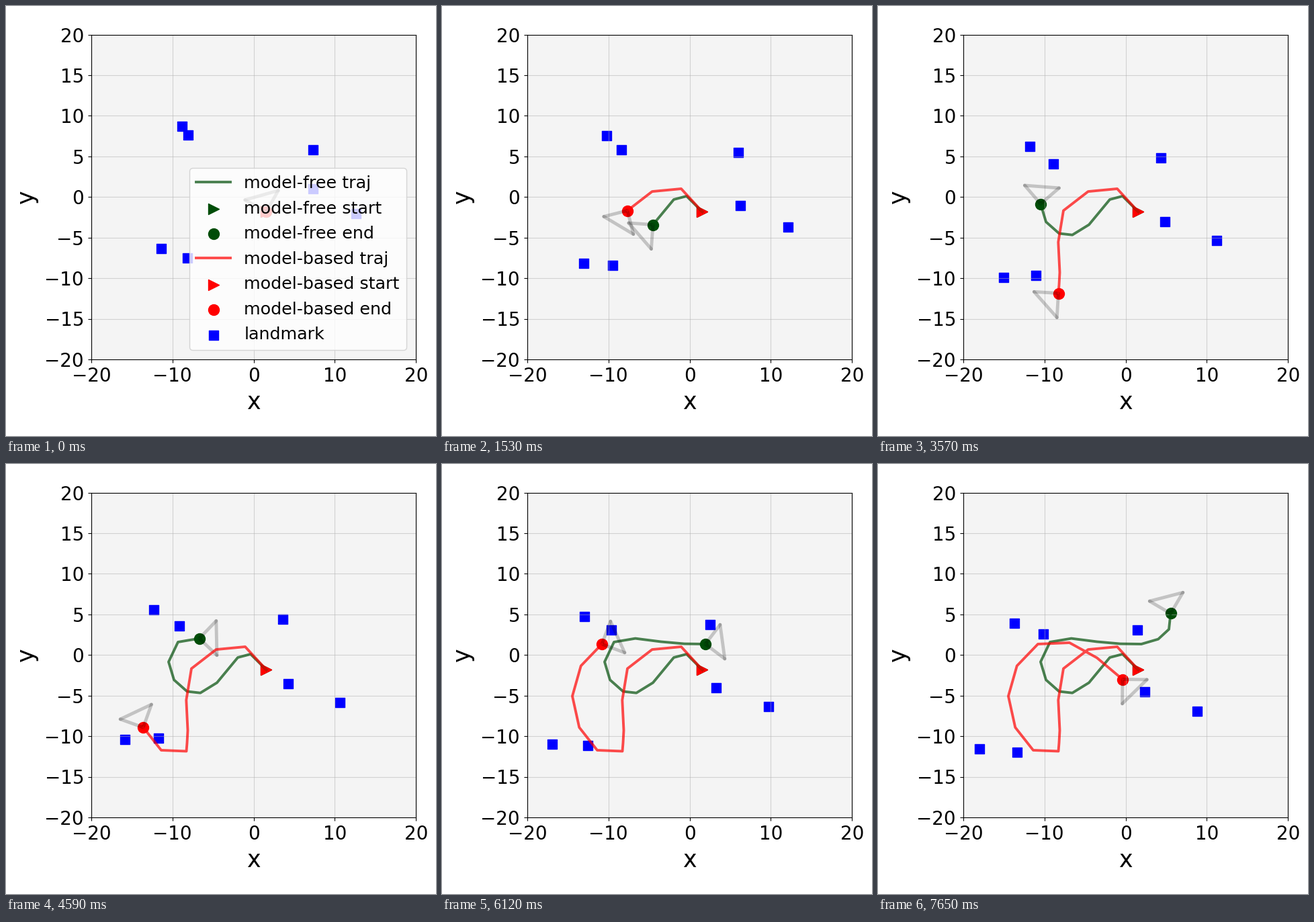
Animation of 640 by 640 pixels, one loop 8000 ms. Source, as a matplotlib script:

```python
import numpy as np
import matplotlib.pyplot as plt
from matplotlib.animation import FuncAnimation

SIZE, DPI = 640, 100
LOOP_MS, STEP_MS, INTERVAL = 8000, 510, 40
LEFT, TOP, SIDE = 127, 42.7, 483.2      # plot area in pixels
STEPS = np.arange(16)


def glide(keys, pixels):
    """Smooth track over all steps through a few stage points, in axis units."""
    keys, points = np.array(keys), np.array(pixels, float)
    points = (points - [LEFT, TOP]) / SIDE * [40, -40] + [-20, 20]
    slopes = np.gradient(points, keys, axis=0)
    i = np.clip(np.searchsorted(keys, STEPS, side="right") - 1, 0, len(keys) - 2)
    span = np.diff(keys)[i][:, None]
    t = (STEPS - keys[i])[:, None] / span
    ease = t * t * (3 - 2 * t)
    bend = t * (1 - t) * ((1 - t) * slopes[i] - t * slopes[i + 1])
    return points[i] * (1 - ease) + points[i + 1] * ease + span * bend


def headings(path):
    """View direction: halfway between the moves into and out of each point."""
    move = np.diff(path, axis=0)
    angle = np.unwrap(np.arctan2(move[:, 1], move[:, 0]))
    ends = 2 * angle[[0, -1]] - angle[[1, -2]]
    angle = np.concatenate([ends[:1], angle, ends[1:]])
    return (angle[:-1] + angle[1:]) / 2


START = (387.5, 306.3)
FREE = glide(
    [0, 1, 2, 3, 5, 7, 8, 10, 12, 14, 15],
    [START, (364, 283), (345, 288), (314, 325.5), (269.5, 338.5), (242, 294.5),
     (256, 265), (326, 264.5), (392, 268), (433, 246), (435.5, 222.5)])
BASED = glide(
    [0, 1, 3, 5, 6, 7, 8, 10, 12, 13, 15],
    [START, (356, 272), (276, 304.5), (270.5, 396.5), (269.5, 415), (268.5, 427.5),
     (231, 426), (194, 345.5), (238, 268), (285, 266), (364, 320.5)])

# Landmark estimates drift down and to the left, slower later on.
LANDMARKS = np.stack([glide([0, 5, 15], track) for track in [
    [(261.5, 179.5), (234.5, 201.5), (203, 237)],
    [(271, 192.5), (264.5, 226.5), (246, 253)],
    [(457.5, 213.5), (430.5, 221.5), (386, 247.5)],
    [(456.5, 272), (435.5, 311.5), (396.5, 339)],
    [(520.5, 309), (510, 340.5), (475, 368)],
    [(230.5, 361.5), (198, 395), (151, 424)],
    [(269.5, 374.5), (243.5, 394), (207, 429)]]], axis=1)

plt.rcParams["font.family"] = "DejaVu Sans"
fig = plt.figure(figsize=(SIZE / DPI, SIZE / DPI), dpi=DPI, facecolor="white")
ax = fig.add_axes([LEFT / SIZE, 1 - (TOP + SIDE) / SIZE, SIDE / SIZE, SIDE / SIZE])
ax.set(xlim=(-20, 20), ylim=(-20, 20), facecolor="#f4f4f4",
       xticks=range(-20, 21, 10), yticks=range(-20, 21, 5))
ax.tick_params(labelsize=20, pad=4.4)
ax.grid(alpha=0.5)
fig.text(369.3 / SIZE, 1 - 600.5 / SIZE, "x", fontsize=25, ha="center", va="baseline")
fig.text(41 / SIZE, 1 - 283.7 / SIZE, "y", fontsize=25, rotation=90,
         rotation_mode="anchor", ha="center", va="baseline")


def mark(points, shape, size, color, label):
    return ax.scatter(*np.transpose(points), s=size ** 2, marker=shape,
                      color=color, linewidths=1, label=label)


class Agent:
    """A trajectory with start and end markers and a view triangle."""

    def __init__(self, name, color, path):
        self.path, self.heading = path, headings(path)
        self.sides = [ax.plot([], [], color="black", alpha=0.2, lw=3.5,
                              solid_capstyle="round")[0] for _ in range(3)]
        self.line, = ax.plot([], [], color=color, alpha=0.7, lw=2.8,
                             label=f"{name} traj")
        mark(path[:1], ">", 11.5, color, f"{name} start")
        self.end = mark(path[:1], "o", 11.5, color, f"{name} end")

    def show(self, step):
        self.line.set_data(*self.path[:step + 1].T)
        tip = self.path[step]
        self.end.set_offsets([tip])
        angles = self.heading[step] + np.radians([45, -45])
        far = tip + 3 * np.column_stack([np.cos(angles), np.sin(angles)])
        corners = [tip, *far, tip]
        for side, a, b in zip(self.sides, corners, corners[1:]):
            side.set_data(*np.transpose([a, b]))


agents = [Agent("model-free", "#004d08", FREE), Agent("model-based", "red", BASED)]
squares = mark(LANDMARKS[0], "s", 10, "blue", "landmark")
legend = ax.legend(loc="lower right", fontsize=18.3, labelspacing=0.535,
                   borderpad=0.42, borderaxespad=0.54)


def update(frame):
    # A change falling inside a frame shows from that frame's start.
    step = min((frame * INTERVAL + INTERVAL - 1) // STEP_MS, STEPS[-1])
    for agent in agents:
        agent.show(step)
    squares.set_offsets(LANDMARKS[step])
    legend.set_visible(step == 0)
    return []


anim = FuncAnimation(fig, update, frames=LOOP_MS // INTERVAL, interval=INTERVAL,
                     repeat=True, repeat_delay=0)
plt.show()
```
